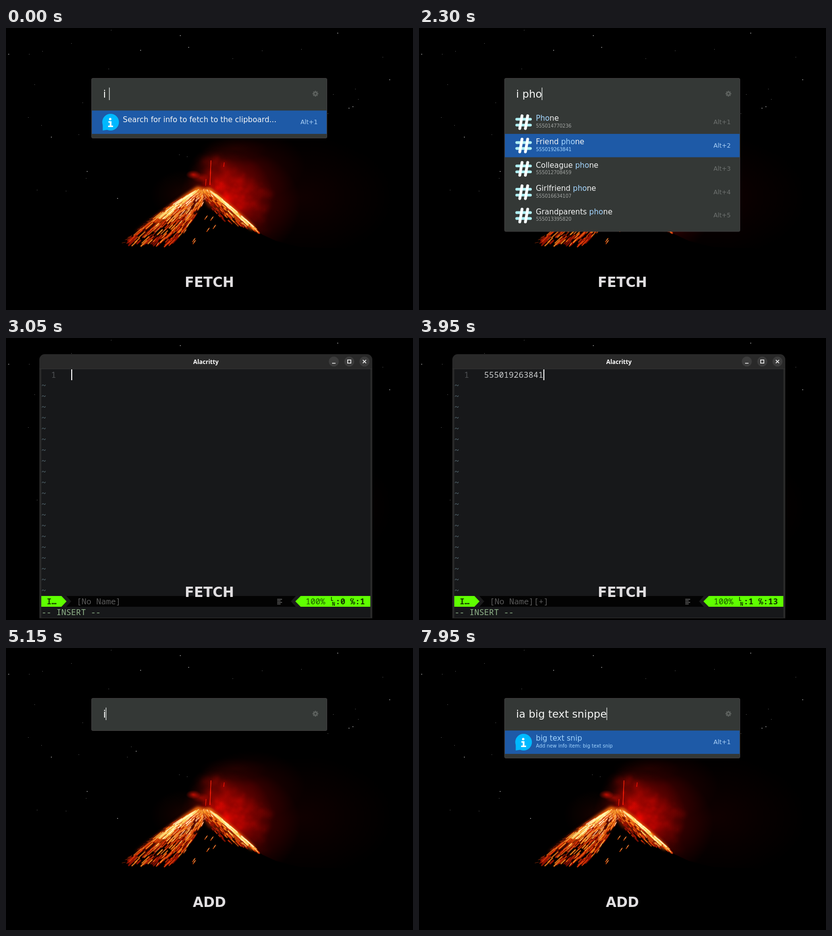
An HTML page with a canvas for the animation above (8000 ms loop, 830 by 575 pixels).

```html
<!DOCTYPE html>
<html lang="en">
<head>
<meta charset="utf-8">
<title>Info launcher</title>
<style>
html, body { margin: 0; width: 100%; height: 100%; overflow: hidden; background: #000; }
canvas { display: block; width: 830px; height: 575px; }
</style>
</head>
<body>
<canvas id="stage" width="830" height="575"></canvas>
<script>
const W = 830, H = 575, LOOP = 8000;
const SANS = '"DejaVu Sans", sans-serif';
const MONO = '"Noto Sans Mono", "DejaVu Sans Mono", monospace';
const ctx = document.getElementById('stage').getContext('2d');

const lerp = (a, b, k) => a + (b - a) * k;
const clamp = (v) => Math.max(0, Math.min(1, v));
const easeOut = (k) => 1 - (1 - k) ** 3;

function seeded(seed) {
  return () => {
    seed = (seed * 1664525 + 1013904223) >>> 0;
    return seed / 4294967296;
  };
}

function text(c, str, x, y, font, color, align = 'left', spacing = 0) {
  c.font = font;
  c.fillStyle = color;
  c.textAlign = align;
  c.letterSpacing = spacing + 'px';
  c.fillText(str, x, y);
}

function rect(c, x, y, w, h, color) {
  c.fillStyle = color;
  c.fillRect(x, y, w, h);
}

function poly(c, points, color) {
  c.beginPath();
  points.forEach(([x, y]) => c.lineTo(x, y));
  c.closePath();
  c.fillStyle = color;
  c.fill();
}

function line(c, x1, y1, x2, y2, width, color) {
  c.beginPath();
  c.moveTo(x1, y1);
  c.lineTo(x2, y2);
  c.lineWidth = width;
  c.strokeStyle = color;
  c.stroke();
}

function disc(c, x, y, r, color) {
  c.beginPath();
  c.arc(x, y, r, 0, Math.PI * 2);
  c.fillStyle = color;
  c.fill();
}

// ---------- wallpaper ----------

const brightStars = [[5, 53], [355, 15], [676, 10], [372, 39], [274, 45], [782, 105], [345, 164],
  [251, 136], [265, 210], [92, 222], [165, 292], [227, 347], [707, 160], [699, 163]];
const dimStars = [[47, 53], [74, 47], [133, 31], [214, 4], [58, 115], [200, 143], [72, 198], [63, 330],
  [122, 332], [602, 43], [522, 46], [527, 110], [584, 113], [768, 59], [462, 62], [209, 83],
  [656, 174], [163, 306], [353, 258], [369, 262], [156, 152], [712, 124], [718, 145], [667, 135],
  [608, 167], [450, 146], [440, 121], [45, 182], [148, 217], [247, 222], [255, 201]];

function glow(c, x, y, rx, ry, rgb, alpha) {
  c.save();
  c.translate(x, y);
  c.scale(rx, ry);
  const g = c.createRadialGradient(0, 0, 0, 0, 0, 1);
  g.addColorStop(0, `rgba(${rgb},${alpha})`);
  g.addColorStop(0.5, `rgba(${rgb},${alpha * 0.45})`);
  g.addColorStop(1, `rgba(${rgb},0)`);
  c.fillStyle = g;
  c.fillRect(-1, -1, 2, 2);
  c.restore();
}

const quad = (a, b, d, s) => (1 - s) ** 2 * a + 2 * s * (1 - s) * b + s * s * d;

// Point on a lava stream; u picks the stream, s runs from the crater down.
function leftFlow(u, s) {
  return [quad(lerp(388, 412, u), lerp(322, 396, u), lerp(234, 334, u), s),
    quad(331 - Math.sin(u * 3) * 3, lerp(364, 384, u), 446, s)];
}

function rightFlow(u, s) {
  return [quad(lerp(396, 416, u), lerp(410, 463, u), lerp(440, 521, u), s),
    quad(329 + u, lerp(362, 364, u), lerp(392, 420, u), s)];
}

function streak(c, flow, u, s0, s1, width, color) {
  c.beginPath();
  for (let i = 0; i <= 5; i++) c.lineTo(...flow(u, lerp(s0, s1, i / 5)));
  c.lineWidth = width;
  c.strokeStyle = color;
  c.stroke();
}

function heat(h) {
  if (h > 0.85) return '#fffad0';
  if (h > 0.66) return '#ffe070';
  if (h > 0.48) return '#ffa228';
  if (h > 0.28) return '#f4480a';
  return '#a01404';
}

// Bright core inside a red halo.
function ember(c, flow, u, s0, s1, width, h) {
  c.globalAlpha = 0.4;
  streak(c, flow, u, s0, s1, width + 2.4, h > 0.5 ? '#e83c00' : '#8c1200');
  c.globalAlpha = 0.9;
  streak(c, flow, u, s0, s1, width, heat(h));
}

function drawPlume(c, rnd) {
  c.globalCompositeOperation = 'lighter';
  glow(c, 450, 345, 95, 95, '150,5,0', 0.7);
  glow(c, 485, 360, 115, 110, '125,0,0', 0.62);
  glow(c, 430, 305, 62, 66, '105,4,0', 0.5);
  glow(c, 600, 345, 190, 125, '32,0,0', 0.5);
  glow(c, 465, 246, 70, 22, '45,2,0', 0.5);
  glow(c, 500, 280, 110, 70, '55,0,0', 0.6);
  glow(c, 360, 340, 65, 50, '45,4,0', 0.5);
  glow(c, 382, 299, 15, 9, '190,15,3', 0.85);
  glow(c, 396, 305, 18, 10, '130,10,0', 0.6);
  for (let i = 0; i < 150; i++) {
    const k = rnd(), r = 5 + rnd() * 14;
    glow(c, 410 + k * 120 + (rnd() - 0.5) * 35, 290 + k * 85 + (rnd() - 0.5) * 85,
      r, r, '120,5,0', 0.14 * (1 - k * 0.6));
  }
  line(c, 418, 270, 416, 320, 1.3, 'rgba(235,40,10,.75)');
  line(c, 445, 274, 444, 283, 1.2, 'rgba(200,20,5,.7)');
  line(c, 408, 308, 407, 322, 1.2, 'rgba(220,40,10,.6)');
  c.globalCompositeOperation = 'source-over';
}

function drawLava(c, rnd) {
  c.lineCap = 'round';
  c.filter = 'blur(3px)';
  c.globalAlpha = 0.5;
  for (let i = 0; i < 10; i++) streak(c, leftFlow, i / 10, 0, 0.8 - i * 0.03, 6, '#9c1e02');
  for (let i = 0; i < 8; i++) streak(c, rightFlow, i / 8, 0, 0.55 + i * 0.05, 6, '#b42a03');
  c.globalAlpha = 0.9;
  streak(c, leftFlow, 0.16, 0, 0.62, 13, '#ee6a0c');
  streak(c, rightFlow, 0.9, 0, 0.9, 9, '#ee6a0c');
  c.filter = 'none';

  // Streams gather into rivulets as they run down.
  const rivers = 13;
  for (let i = 0; i < 430; i++) {
    const s = rnd() ** 1.15 * 0.93;
    const spread = (rnd() - 0.5) * lerp(1.6, 0.55, s);
    const u = clamp((Math.floor(rnd() * rivers) + 0.5 + spread) / rivers);
    const h = 1.08 - s * 0.8 - u * 0.16 + (rnd() - 0.5) * 0.55;
    ember(c, leftFlow, u, s, Math.min(1, s + 0.03 + rnd() * 0.08), 0.7 + rnd() * 1.3, h);
  }
  for (let i = 0; i < 200; i++) {
    const u = 1 - rnd() ** 1.5, s = rnd() * 0.94;
    const h = 0.45 + u * 0.5 - s * 0.35 + (rnd() - 0.5) * 0.5;
    ember(c, rightFlow, u, s, Math.min(1, s + 0.03 + rnd() * 0.08), 0.8 + rnd() * 1.2, h);
  }

  // White-hot ridges
  c.globalAlpha = 0.85;
  for (let i = 0; i < 46; i++) {
    const color = i % 3 ? '#fff6b4' : '#ffd658';
    const s = rnd() * 0.5, r = rnd() * 0.74;
    streak(c, leftFlow, 0.07 + rnd() * 0.2, s, s + 0.1, 1.3 + rnd() * 1.6, color);
    streak(c, rightFlow, 0.8 + rnd() * 0.18, r, r + 0.14, 1.2 + rnd() * 1.5, color);
  }

  // Sparks off the outer edge and loose embers
  c.globalAlpha = 0.8;
  for (let i = 0; i < 45; i++) {
    const [x, y] = leftFlow(0, 0.25 + rnd() * 0.7);
    line(c, x, y - rnd() * 4, x - 7, y + 4 - rnd() * 4, 0.7, rnd() > 0.5 ? '#8c1c04' : '#d0440c');
  }
  [[383, 432], [412, 411], [425, 405], [365, 414], [384, 436], [309, 441], [408, 386], [420, 388]]
    .forEach(([x, y]) => {
      line(c, x - 2.5, y + 4, x + 2.5, y - 3, 2, '#ee5208');
      line(c, x - 0.5, y + 1, x + 1.5, y - 2, 1.1, '#ffd080');
    });
  c.globalAlpha = 1;
  glow(c, 402, 334, 26, 12, '255,170,40', 0.6);
}

function paintWallpaper() {
  const canvas = document.createElement('canvas');
  canvas.width = W;
  canvas.height = H;
  const c = canvas.getContext('2d'), rnd = seeded(41);
  rect(c, 0, 0, W, H, '#000');
  dimStars.forEach(([x, y]) => rect(c, x, y, 1, 1, '#777'));
  brightStars.forEach(([x, y]) => rect(c, x - 0.2, y - 0.2, 1.4, 1.4, '#e4e4e4'));
  drawPlume(c, rnd);
  poly(c, [[225, 450], [300, 392], [350, 354], [388, 330], [414, 330], [440, 352], [470, 375],
    [500, 403], [522, 421], [550, 434], [600, 447], [830, 455], [830, 575], [225, 575]], '#000');
  drawLava(c, rnd);
  return canvas;
}

const wallpaper = paintWallpaper();

// ---------- launcher ----------

const BOX = { x: 174.5, y: 102.5, w: 480, rows: 168.3, rowH: 47.6 };
const PALE = '#a4d6ff';

const phones = [
  { icon: 'hash', title: 'Phone', sub: '555014770236' },
  { icon: 'hash', title: 'Friend phone', sub: '555019263841' },
  { icon: 'hash', title: 'Colleague phone', sub: '555012708459' },
  { icon: 'hash', title: 'Girlfriend phone', sub: '555016634107' },
  { icon: 'hash', title: 'Grandparents phone', sub: '555013395820' },
];
const allItems = [
  phones[0],
  { icon: 'info', title: 'Text piece', sub: 'This is an example of a piece text...' },
  ...phones.slice(1),
  { icon: 'at', title: 'Grandparents email', sub: 'nn@post.test' },
];

const icons = {
  hash(c) {
    c.lineCap = 'round';
    for (const y of [-6, 6]) line(c, -14, y, 14, y, 5.6, '#aeeff3');
    for (const x of [-5.5, 6]) line(c, x + 2.3, -13, x - 2.3, 13, 5.8, '#f7feff');
  },
  info(c) {
    disc(c, 0, 0, 17, '#00b9ff');
    poly(c, [[-16, 2], [-16, 17], [-4, 15]], '#00b9ff');
    disc(c, -0.8, -6.3, 2.5, '#fff');
    rect(c, -4.5, -2, 6, 3, '#fff');
    rect(c, -1.8, -2, 3.6, 11, '#fff');
    rect(c, -5, 7, 10, 3, '#fff');
  },
  at(c) {
    text(c, '@', 0, 8.5, `bold 31px ${SANS}`, '#df1712', 'center');
  },
};

function drawTitle(item, y, match) {
  const font = `15.15px ${SANS}`;
  const at = match ? item.title.toLowerCase().indexOf(match) : -1;
  const cut = at < 0 ? [item.title, '', '']
    : [item.title.slice(0, at), item.title.slice(at, at + match.length), item.title.slice(at + match.length)];
  let x = 238.3;
  cut.forEach((part, i) => {
    text(ctx, part, x, y, font, i === 1 ? PALE : '#f4f5f5');
    x += ctx.measureText(part).width;
  });
}

function drawRow(item, index, selected, match) {
  const y = BOX.rows + index * BOX.rowH;
  if (selected) rect(ctx, BOX.x + 0.7, y, BOX.w - 1.4, BOX.rowH, '#1e5aa7');
  ctx.save();
  ctx.translate(213.3, y + 23.7);
  icons[item.icon](ctx);
  ctx.restore();
  drawTitle(item, y + (item.sub ? 21 : 23.7), match);
  if (item.sub) {
    const spacing = /^\d+$/.test(item.sub) ? -0.22 : 0;
    text(ctx, item.sub, 238.5, y + 34.7, `9.8px ${SANS}`, selected ? PALE : '#a0a3a1', 'left', spacing);
  }
  text(ctx, 'Alt+' + (index + 1), 635.8, y + 27.7, `12.5px ${SANS}`, selected ? '#a9d0f7' : '#6d716f', 'right');
}

function drawGear(x, y) {
  const color = '#5c605e';
  ctx.lineCap = 'butt';
  for (let i = 0; i < 4; i++) {
    const a = i * Math.PI / 4, dx = Math.cos(a) * 6, dy = Math.sin(a) * 6;
    line(ctx, x - dx, y - dy, x + dx, y + dy, 2.4, color);
  }
  disc(ctx, x, y, 4.6, color);
  disc(ctx, x, y, 1.8, '#343836');
}

function drawLauncher({ query, items, selected = 0, match = '' }) {
  const h = 66 + items.length * BOX.rowH + (items.length ? 8.4 : 0);
  ctx.beginPath();
  ctx.roundRect(BOX.x, BOX.y, BOX.w, h, 2.5);
  ctx.fillStyle = '#343836';
  ctx.fill();
  ctx.lineWidth = 1;
  ctx.strokeStyle = '#403d3e';
  ctx.stroke();
  text(ctx, query, 198, 142, `21.3px ${SANS}`, '#f5f6f5');
  rect(ctx, 198 + ctx.measureText(query).width - 0.6, 121.5, 1.4, 25.5, '#d5d9d7');
  drawGear(631, 134);
  items.forEach((item, i) => drawRow(item, i, i === selected, match));
}

// Results follow the typed text after a short delay.
function fetchState(t) {
  const query = t < 400 ? 'i ' : t < 1150 ? 'i p' : t < 1400 ? 'i ph' : 'i pho';
  const match = t < 500 ? '' : t < 1300 ? 'p' : t < 1500 ? 'ph' : 'pho';
  const items = !match ? [{ icon: 'info', title: 'Search for info to fetch to the clipboard...' }]
    : match === 'p' ? allItems : phones;
  return { query, items, match, selected: t < 2000 ? 0 : 1 };
}

function addState(t) {
  const full = 'ia big text snippets';
  const typed = (time) => {
    if (time < 5100) return '';
    if (time < 5250) return 'i';
    if (time < 5700) return 'ia';
    if (time < 6100) return 'ia ';
    return full.slice(0, 4 + Math.floor((time - 6100) / 130));
  };
  const name = typed(t - 250).slice(3).trim();
  const items = t < 5350 ? []
    : name ? [{ icon: 'info', title: name, sub: 'Add new info item: ' + name }]
    : [{ icon: 'info', title: 'Add a new info item to the list...' }];
  return { query: typed(t), items, match: name };
}

// ---------- terminal ----------

function drawButtons() {
  for (const x of [668.5, 700, 731]) disc(ctx, x, 48, 10.3, '#3c3c3c');
  ctx.lineCap = 'butt';
  line(ctx, 665, 51.5, 672, 51.5, 1.4, '#fff');
  ctx.strokeRect(696.7, 44.7, 6.6, 6.6);
  line(ctx, 727.7, 44.7, 734.3, 51.3, 1.5, '#fff');
  line(ctx, 734.3, 44.7, 727.7, 51.3, 1.5, '#fff');
}

function drawStatus(pasted) {
  const green = '#5fff00', ink = '#123000', bold = `bold 16.7px ${MONO}`;
  rect(ctx, 72, 526, 671, 22, '#030303');
  poly(ctx, [[113, 526], [123, 526], [133, 537], [123, 548], [113, 548]], '#1b1b1c');
  poly(ctx, [[72, 526], [113, 526], [123.5, 537], [113, 548], [72, 548]], green);
  text(ctx, 'I…', 83, 543, bold, ink);
  text(ctx, pasted ? '[No Name][+]' : '[No Name]', 144, 543, `16.7px ${MONO}`, '#5b5b5b');

  // The right section grows by one cell with a two-digit column.
  const left = pasted ? 580 : 590;
  poly(ctx, [[left + 1, 526], [left + 11, 526], [left + 11, 548], [left + 1, 548], [left - 9, 537]], '#1b1b1c');
  poly(ctx, [[743, 526], [left + 11, 526], [left, 537], [left + 11, 548], [743, 548]], green);
  [10, 7, 10, 7].forEach((w, i) => rect(ctx, left - 37, 532 + i * 3.2, w, 1.4, '#707070'));
  text(ctx, '100%', left + 21, 543, `16.7px ${MONO}`, '#1b5200');
  text(ctx, 'L', left + 72, 536, `bold 10px ${MONO}`, ink);
  text(ctx, 'N', left + 75, 546, `bold 10px ${MONO}`, ink);
  text(ctx, pasted ? ':1' : ':0', left + 82, 543, bold, ink);
  text(ctx, pasted ? '℅:13' : '℅:1', left + 112, 543, bold, ink);
}

function drawTerminal(pasted) {
  const font = `16.75px ${MONO}`;
  ctx.beginPath();
  ctx.roundRect(68, 33, 679, 538.5, [11, 11, 0, 0]);
  ctx.fillStyle = '#292929';
  ctx.fill();
  rect(ctx, 72, 63, 671, 507, '#17181a');
  rect(ctx, 68, 62.5, 679, 1, '#363636');
  text(ctx, 'Alacritty', 407.7, 52.5, 'bold 12px "Noto Sans", sans-serif', '#fff', 'center');
  drawButtons();
  text(ctx, '1', 92, 81, font, '#505255');
  for (let i = 1; i <= 20; i++) text(ctx, '~', 72, 81 + i * 22, font, '#566a72');
  const typed = pasted ? phones[1].sub : '';
  text(ctx, typed, 132.8, 81, font, '#c9cbcc');
  rect(ctx, 133 + ctx.measureText(typed).width, 64, 2, 22, '#fff');
  drawStatus(pasted);
  text(ctx, '-- INSERT --', 72.5, 565, font, '#91b58b');
}

function showTerminal(t) {
  const opening = easeOut(clamp((t - 2900) / 130));
  const closing = clamp((t - 4150) / 150);
  const scale = lerp(0.9, 1, opening) * lerp(1, 0.9, closing);
  ctx.save();
  ctx.globalAlpha = opening * (1 - closing);
  ctx.translate(407.5, 302);
  ctx.scale(scale, scale);
  ctx.translate(-407.5, -302);
  drawTerminal(t >= 3400);
  ctx.restore();
}

// ---------- loop ----------

function draw(t) {
  ctx.drawImage(wallpaper, 0, 0);
  if (t < 2450) drawLauncher(fetchState(t));
  else if (t >= 2900 && t < 4300) showTerminal(t);
  else if (t >= 4900) drawLauncher(addState(t));
  text(ctx, t < 4750 ? 'FETCH' : 'ADD', 414.8, 528, `bold 27.8px ${SANS}`, '#e1dfe1', 'center');
}

const start = performance.now();
function tick() {
  draw((performance.now() - start) % LOOP);
  requestAnimationFrame(tick);
}
tick();
</script>
</body>
</html>
```
